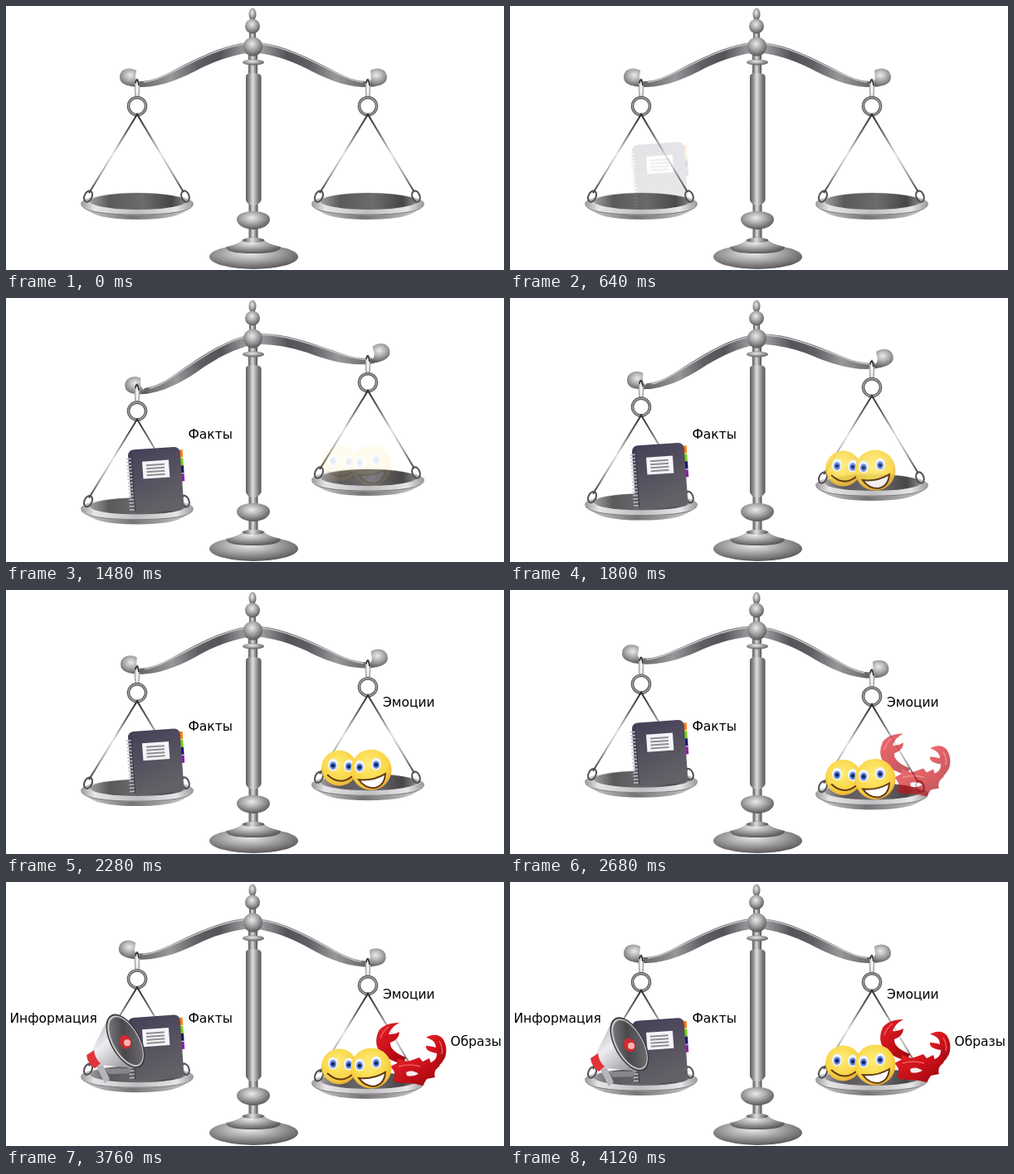
These frames come from a looping animation (600 by 319 pixels, 7920 ms). An HTML page:

```html
<!DOCTYPE html>
<html lang="ru">
<head>
<meta charset="utf-8">
<title>Весы</title>
<style>
  html, body { margin: 0; width: 100%; height: 100%; overflow: hidden; background: #fff; }
  svg { display: block; width: 100%; height: 100%; }
  text { font: 15.5px "DejaVu Sans", sans-serif; fill: #000; }
</style>
</head>
<body>
<svg viewBox="0 0 600 319">
  <defs>
    <linearGradient id="rod">
      <stop offset="0" stop-color="#5c5a5c"/><stop offset=".2" stop-color="#8b898b"/>
      <stop offset=".45" stop-color="#dedddf"/><stop offset=".7" stop-color="#9a989a"/>
      <stop offset="1" stop-color="#525053"/>
    </linearGradient>
    <radialGradient id="ball" cx=".45" cy=".36" r=".62">
      <stop offset="0" stop-color="#ebebec"/><stop offset=".45" stop-color="#b0aeb0"/>
      <stop offset="1" stop-color="#5f5d60"/>
    </radialGradient>
    <linearGradient id="arm" gradientUnits="userSpaceOnUse" x1="160" x2="290" y1="0" y2="0">
      <stop offset="0" stop-color="#686669"/><stop offset=".3" stop-color="#99979a"/>
      <stop offset=".55" stop-color="#605e62"/><stop offset=".75" stop-color="#555358"/>
      <stop offset="1" stop-color="#a19fa2"/>
    </linearGradient>
    <linearGradient id="string" gradientUnits="userSpaceOnUse" x1="0" x2="0" y1="130" y2="228">
      <stop offset="0" stop-color="#2b292b"/><stop offset=".25" stop-color="#6a686a"/>
      <stop offset=".5" stop-color="#e4e2e4"/><stop offset=".72" stop-color="#aaa8aa"/>
      <stop offset="1" stop-color="#343234"/>
    </linearGradient>
    <linearGradient id="rim">
      <stop offset="0" stop-color="#99979a"/><stop offset=".12" stop-color="#e6e5e7"/>
      <stop offset=".5" stop-color="#c0bec1"/><stop offset=".85" stop-color="#e6e5e7"/>
      <stop offset="1" stop-color="#99979a"/>
    </linearGradient>
    <linearGradient id="bowl">
      <stop offset="0" stop-color="#cfcdd0"/><stop offset=".45" stop-color="#757376"/>
      <stop offset=".7" stop-color="#9b999c"/><stop offset="1" stop-color="#cfcdd0"/>
    </linearGradient>
    <linearGradient id="well">
      <stop offset="0" stop-color="#a09ea0"/><stop offset=".2" stop-color="#5b595b"/>
      <stop offset=".55" stop-color="#6d6b6d"/><stop offset=".85" stop-color="#474547"/>
      <stop offset="1" stop-color="#8b898b"/>
    </linearGradient>
    <linearGradient id="cover" x2=".3" y2="1">
      <stop offset="0" stop-color="#453f57"/><stop offset=".55" stop-color="#55515f"/>
      <stop offset="1" stop-color="#626166"/>
    </linearGradient>
    <radialGradient id="face" cx=".45" cy=".38" r=".65">
      <stop offset="0" stop-color="#ffee79"/><stop offset=".7" stop-color="#f9d547"/>
      <stop offset="1" stop-color="#eaa934"/>
    </radialGradient>
    <linearGradient id="cone" x2=".8" y2="1">
      <stop offset="0" stop-color="#a3a2a8"/><stop offset=".45" stop-color="#eeedf1"/>
      <stop offset="1" stop-color="#939197"/>
    </linearGradient>
    <linearGradient id="mouth" x2="1" y2="1">
      <stop offset="0" stop-color="#8b8a8e"/><stop offset=".45" stop-color="#4a484b"/>
      <stop offset="1" stop-color="#77757a"/>
    </linearGradient>
    <linearGradient id="red" x2="1" y2="1">
      <stop offset="0" stop-color="#e6232a"/><stop offset=".5" stop-color="#c81018"/>
      <stop offset="1" stop-color="#95060e"/>
    </linearGradient>

    <g id="half-beam">
      <path fill="url(#arm)" d="M291 44C262 47 233 62 205 76C188 85 176 91 160 91L156 97Q161 98 166 98C190 97 215 86 235 75C255 65 275 59 291 57Z"/>
      <path fill="none" stroke="#c3c1c4" stroke-width="1.500" d="M288 46C262 49 234 63 206 77C190 85 178 91 166 92"/>
      <path fill="url(#ball)" d="M157 78C150 73 137 75 137 86C137 95 148 98 165 98Q157 93 156 87Z"/>
    </g>

    <g id="pan">
      <ellipse cx="158" cy="100" rx="2.500" ry="12" fill="#f2f1f3" stroke="#a8a6a9" stroke-width="1.500"/>
      <path d="M156 93Q158 84 160 96" fill="none" stroke="#242224" stroke-width="1.500"/>
      <circle cx="158" cy="121" r="10.500" fill="none" stroke="#5e5c5f" stroke-width="3.600"/>
      <circle cx="158" cy="121" r="10.500" fill="none" stroke="#a8a6a9" stroke-width="1.200"/>
      <path d="M95 243Q104 258 158 258T221 243Z" fill="url(#bowl)"/>
      <ellipse cx="158" cy="239" rx="68" ry="13.500" fill="url(#rim)"/>
      <path d="M91 241Q96 252 158 252T225 241" fill="none" stroke="#807e81" stroke-width="1"/>
      <ellipse cx="159" cy="236" rx="58" ry="10" fill="url(#well)"/>
      <path d="M100 226L158 131L214 225" fill="none" stroke="url(#string)" stroke-width="2"/>
      <g fill="none" stroke="#514f52" stroke-width="2">
        <ellipse cx="99" cy="230" rx="4.500" ry="7" transform="rotate(25 99 230)"/>
        <ellipse cx="216" cy="230" rx="4.500" ry="7" transform="rotate(-20 216 230)"/>
      </g>
    </g>

    <g id="eye">
      <ellipse rx="6" ry="7.500" fill="#f0f3ff"/>
      <ellipse cy="1" rx="4" ry="4.800" fill="#5c83df"/>
      <circle cy="1" r="2.200" fill="#16204f"/>
    </g>
  </defs>

  <g id="beam">
    <use href="#half-beam"/>
    <use href="#half-beam" transform="translate(596 0) scale(-1 1)"/>
  </g>

  <g id="stand">
    <ellipse cx="297" cy="10" rx="4.500" ry="7.500" fill="url(#ball)"/>
    <rect x="293" y="31" width="8" height="10" fill="url(#rod)"/>
    <circle cx="297" cy="24.500" r="9" fill="url(#ball)"/>
    <rect x="292" y="58" width="11" height="28" fill="url(#rod)"/>
    <circle cx="297.500" cy="49" r="11.500" fill="url(#ball)"/>
    <ellipse cx="298" cy="68" rx="13" ry="3.500" fill="url(#ball)"/>
    <rect x="292.500" y="232" width="11" height="53" fill="url(#rod)"/>
    <path d="M289 85Q289 81 298 81T307.500 85V235Q304 241 298 241T289 235Z" fill="url(#rod)"/>
    <path d="M278 258C278 251 288 248 298 248S318 251 318 258S308 270 298 270S278 265 278 258Z" fill="url(#ball)"/>
    <ellipse cx="298.500" cy="303" rx="53.500" ry="15" fill="url(#ball)"/>
    <path d="M285 282Q298 277 311 282Q313 287 331 291Q331 299 298 299T265 291Q283 287 285 282Z" fill="url(#ball)"/>
    <ellipse cx="298" cy="283" rx="13" ry="3" fill="url(#rod)"/>
  </g>

  <g id="left">
    <use href="#pan"/>
    <g id="book">
      <g transform="translate(180 203) rotate(-4)">
        <rect x="29" y="-33" width="6" height="9" fill="#ff7e14"/>
        <rect x="29" y="-23" width="6" height="9" fill="#77d512"/>
        <rect x="29" y="-14" width="6" height="9" fill="#17146a"/>
        <rect x="29" y="-4" width="6" height="9" fill="#8a1fa3"/>
        <rect x="-31" y="-37" width="63" height="77" rx="7" fill="url(#cover)"/>
        <path d="M-27 -35V37" stroke="#3a3644" stroke-width="1"/>
        <path d="M-30.500 -27V37" stroke="#bfbdc2" stroke-width="6" stroke-dasharray="1.500 2.600"/>
        <rect x="-14.500" y="-22" width="32" height="21" fill="#f5f4f7"/>
        <path d="M-10 -17H12M-10 -13H12M-10 -9H12M-10 -5H12" stroke="#908e93" stroke-width="2"/>
      </g>
    </g>
    <g id="megaphone">
      <path d="M109 227L116 223L125 242L119 247Z" fill="#b7b6bd"/>
      <path d="M118 229L152 229L148 235L124 236Z" fill="#88868b"/>
      <path d="M123 168L103 209Q105 222 114 225L160 229Z" fill="url(#cone)"/>
      <path d="M97 213L106 207Q107 217 114 223L107 229Q98 223 97 213Z" fill="#e0343a"/>
      <ellipse cx="144" cy="196" rx="18" ry="36" transform="rotate(-29 144 196)" fill="#3d3b3e"/>
      <ellipse cx="144" cy="196" rx="16.500" ry="34" transform="rotate(-29 144 196)" fill="#c9c8cc"/>
      <ellipse cx="144.500" cy="196" rx="15" ry="32" transform="rotate(-29 144.500 196)" fill="url(#mouth)"/>
      <ellipse cx="144" cy="197" rx="7" ry="8.500" transform="rotate(-25 144 197)" fill="#cf2a30"/>
      <circle cx="146" cy="198" r="4" fill="#f6b5b3"/>
    </g>
  </g>

  <g id="right">
    <use href="#pan" x="278"/>
    <g id="crab" fill="url(#red)">
      <path d="M478 216Q462 212 452 203Q442 192 449 176Q456 166 474 166Q464 171 461 180Q468 181 474 177Q474 186 463 190Q462 200 482 208Z"/>
      <path d="M506 216Q520 213 519 203Q505 201 506 194Q512 194 518 196Q518 187 506 184Q518 177 526 185Q533 196 529 208Q523 220 510 226Z"/>
      <path d="M463 219L471 215L472 209L484 213L498 208L502 213L510 209L512 215L523 218Q514 224 517 232L507 234L502 242Q492 239 482 239Q470 239 466 236Q472 227 463 219Z"/>
      <path d="M482 226Q489 222 497 228Q489 232 483 230Z" fill="#f7eeee"/>
      <path d="M473 219Q486 215 499 219M451 185Q454 176 461 171M522 188Q527 196 525 204" fill="none" stroke="#f0585b" stroke-width="1.500"/>
    </g>
    <g id="emoji">
      <circle cx="401.500" cy="219" r="21.500" fill="url(#face)"/>
      <use href="#eye" x="394" y="215"/>
      <use href="#eye" x="413" y="216"/>
      <path d="M387 227Q402 241 417 229" fill="none" stroke="#5f3a14" stroke-width="2"/>
      <circle cx="440" cy="221" r="24.500" fill="url(#face)"/>
      <use href="#eye" x="426" y="217"/>
      <use href="#eye" x="446" y="214"/>
      <path d="M425 233Q442 235 457 226Q456 241 443 243Q432 243 425 233Z" fill="#fff" stroke="#5f3a14" stroke-width="2"/>
    </g>
  </g>

  <text id="facts" x="219.500" y="169.500">Факты</text>
  <text id="emotions" x="454" y="141">Эмоции</text>
  <text id="images" x="535.500" y="197.500">Образы</text>
  <text id="info" x="4.500" y="169.500">Информация</text>
</svg>
<script>
  const LOOP = 7920, STEP = 40;
  const byId = id => document.getElementById(id);

  // [time, downward shift of the beam's left end]
  const tiltKeys = [[1040, 0], [1400, 22], [1480, 20], [2280, 4], [2340, 4],
                    [2760, -12.5], [3200, -12.5], [4120, 0]];
  const fades = { book: [560, 1120], emoji: [1440, 1840], crab: [2360, 2840], megaphone: [2920, 3360] };
  const labels = { facts: 1400, emotions: 2240, images: 2800, info: 3360 };

  const progress = (t, [start, end]) => Math.min(1, Math.max(0, (t - start) / (end - start)));

  function tiltAt(t) {
    let value = 0;
    for (let i = 1; i < tiltKeys.length; i++) {
      const [t0, v0] = tiltKeys[i - 1], [t1, v1] = tiltKeys[i];
      if (t >= t0) value = v0 + (v1 - v0) * progress(t, [t0, t1]);
    }
    return value;
  }

  function render(t) {
    const tilt = tiltAt(t);
    const angle = -Math.asin(tilt / 150) * 180 / Math.PI;
    byId('beam').setAttribute('transform', `rotate(${angle} 297.5 49)`);
    byId('left').setAttribute('transform', `translate(0 ${tilt * 0.78})`);
    byId('right').setAttribute('transform', `translate(0 ${-tilt * (tilt > 0 ? 0.95 : 0.8)})`);
    for (const id in fades) byId(id).setAttribute('opacity', progress(t, fades[id]));
    for (const id in labels) byId(id).setAttribute('visibility', t >= labels[id] ? 'visible' : 'hidden');
  }

  const start = performance.now();
  function frame() {
    const t = (performance.now() - start) % LOOP;
    render(Math.floor(t / STEP) * STEP);
    requestAnimationFrame(frame);
  }
  frame();
</script>
</body>
</html>
```
